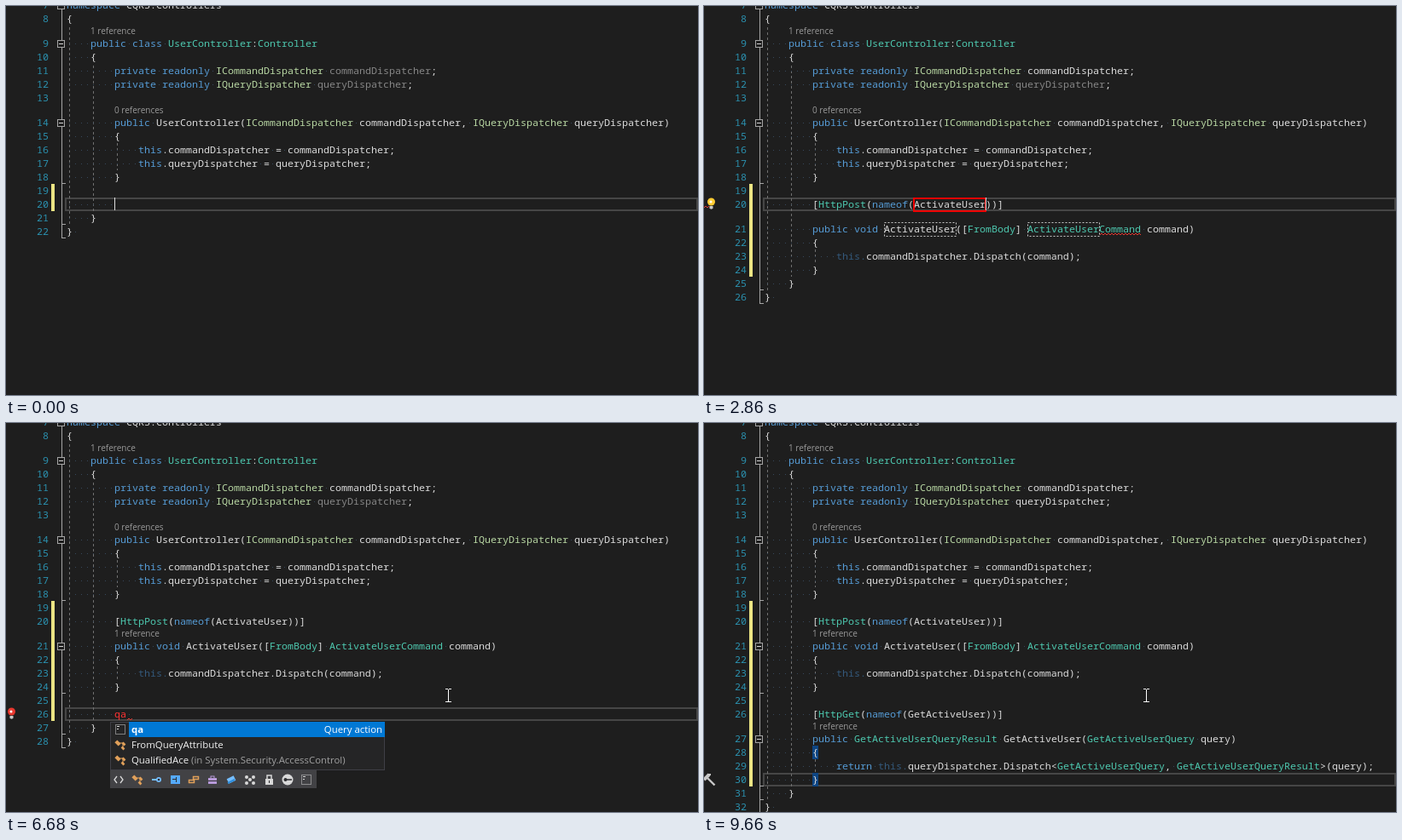
An HTML page with a canvas for the animation above (9810 ms loop, 811 by 457 pixels).

```html
<!DOCTYPE html>
<html lang="en">
<head>
<meta charset="utf-8">
<title>Code templates</title>
<style>
html, body { margin: 0; width: 100%; height: 100%; overflow: hidden; background: #1e1e1e; }
canvas { display: block; }
</style>
</head>
<body>
<canvas id="stage" width="811" height="457"></canvas>
<script>
const g = document.getElementById('stage').getContext('2d');
const LOOP = 9810, CW = 7, LEFT = 71;
const CODE = '11.667px "Noto Sans Mono", "DejaVu Sans Mono", monospace';
const UI = '"Open Sans", "Noto Sans", sans-serif';
const COLORS = { d: '#dcdcdc', k: '#569cd6', t: '#4ec9b0', i: '#b8d7a3', u: '#868686', f: '#34597b', r: '#ff3333' };
const colX = c => LEFT + c * CW;

// Last entry whose start time has passed.
function pick(t, steps) {
  let cur = steps[0];
  for (const s of steps) if (t >= s[0]) cur = s;
  return cur;
}

function rect(color, x, y, w, h) {
  g.fillStyle = color;
  g.fillRect(x, y, w, h);
}

function frame(color, x, y, w, h, width = 1, dash = []) {
  g.strokeStyle = color;
  g.lineWidth = width;
  g.setLineDash(dash);
  g.strokeRect(x, y, w, h);
  g.setLineDash([]);
}

function line(color, pts, width = 1, dash = []) {
  g.strokeStyle = color;
  g.lineWidth = width;
  g.setLineDash(dash);
  g.beginPath();
  pts.forEach(([x, y]) => g.lineTo(x, y));
  g.stroke();
  g.setLineDash([]);
}

function disc(color, x, y, r) {
  g.fillStyle = color;
  g.beginPath();
  g.arc(x, y, r, 0, 7);
  g.fill();
}

function label(text, x, y, color, font, align = 'left') {
  g.font = font;
  g.fillStyle = color;
  g.textAlign = align;
  g.fillText(text, x, y);
  g.textAlign = 'left';
}

function squiggle(x0, x1, y) {
  const pts = [];
  for (let x = x0; x <= x1; x += 2) pts.push([x, y + ((x - x0) / 2 % 2 ? -1 : 1)]);
  line('#e8382f', pts);
}

// ^c sets a colour, « » dashed field, ‹ › active field, ~ toggles a squiggle.
function codeLine(src, y) {
  let col = 0, color = 'd', word = '', box = 0, wave = -1;
  const flush = () => {
    if (word) label(word, colX(col - word.length), y + 4, COLORS[color], CODE);
    word = '';
  };
  for (let i = 0; i < src.length; i++) {
    const ch = src[i];
    if (ch === '^') { flush(); color = src[++i]; }
    else if (ch === '«' || ch === '‹') { flush(); box = col; }
    else if (ch === '»') { flush(); frame('#c8c8c8', colX(box) + .5, y - 7.5, (col - box) * CW, 16, 1, [2, 2]); }
    else if (ch === '›') { flush(); frame('#f00000', colX(box), y - 7, (col - box) * CW, 15, 2); }
    else if (ch === '~') {
      flush();
      if (wave < 0) wave = col;
      else { squiggle(colX(wave) + 1, colX(col) + 1, y + 6); wave = -1; }
    } else if (ch === ' ') {
      flush();
      rect('#36475a', colX(col) + 3, y, 1, 1);
      col++;
    } else { word += ch; col++; }
  }
  flush();
}

function postLines(t) {
  const name = pick(t, [[1640, 'Action'], [1940, 'A'], [2090, 'Act'], [2250, 'Activ'], [2400, 'Activat'],
    [2550, 'ActivateU'], [2700, 'ActivateUs'], [2860, 'ActivateUser']])[1];
  const edit = t < 3090;
  const self = t < 2090 ? '^k' : '^f';
  return [
    `        [^tHttpPost^d(^knameof^d(${edit ? `‹${name}›` : name}))]`,
    `        ^kpublic void ^d${edit ? `«${name}»` : name}([^tFromBody^d] ^t` +
      (edit ? `«${name}»~Command~` : t < 3210 ? `~${name}Command~` : `${name}Command`) + ' ^dcommand)',
    '        {',
    `            ${self}this.^dcommandDispatcher.Dispatch(command);`,
    '        }'
  ];
}

function getName(t) {
  return pick(t, [[6990, 'Action'], [7190, 'Get'], [7310, 'GetAc'], [7440, 'GetActiv'],
    [7560, 'GetActiveUs'], [7690, 'GetActiveUser']])[1];
}

function getLines(t) {
  const name = getName(t), edit = t < 8830;
  const field = edit ? `«${name}»` : name;
  const c = t < 7970 ? '^d' : '^t';
  const end = t < 8080 ? '}~ ~' : '}';
  return [
    `        [^tHttpGet^d(^knameof^d(${edit ? `‹${name}›` : name}))]`,
    `        ^kpublic ${c}${field}QueryResult ^d${name}(${c}${field}Query ^dquery)`,
    '        {',
    `            ^kreturn ${t < 7310 ? '^k' : '^f'}this.^dqueryDispatcher.Dispatch<${c}${field}Query^d, ${c}${field}QueryResult^d>(query);`,
    '        ' + end
  ];
}

function rows(t) {
  const out = [
    '^knamespace ^dCQRS.Controllers',
    '{',
    '    ^kpublic class ^tUserController^d:^tController',
    '    {',
    `        ^kprivate readonly ^iICommandDispatcher ^${t < 1640 ? 'u' : 'd'}commandDispatcher^d;`,
    `        ^kprivate readonly ^iIQueryDispatcher ^${t < 7060 ? 'u' : 'd'}queryDispatcher^d;`,
    '',
    '        ^kpublic ^dUserController(^iICommandDispatcher ^dcommandDispatcher, ^iIQueryDispatcher ^dqueryDispatcher)',
    '        {',
    '            ^kthis^d.commandDispatcher = commandDispatcher;',
    '            ^kthis^d.queryDispatcher = queryDispatcher;',
    '        }',
    ''
  ];
  if (t < 1640) {
    out.push('        ' + pick(t, [[0, ''], [150, 'c'], [560, 'ca'], [840, '^rca~ ~'], [970, 'ca']])[1]);
  } else {
    out.push(...postLines(t));
    if (t >= 4470) out.push(t < 4870 ? '        ' : '');
    if (t >= 6990) out.push(...getLines(t));
    else if (t >= 4870)
      out.push('        ' + pick(t, [[0, ''], [6060, 'q'], [6420, 'qa'], [6610, '^rqa~ ~']])[1]);
  }
  out.push(t >= 6990 && t < 8080 ? '    ~}~' : '    }', '} ');
  return out;
}

function bulb(x, y, color) {
  disc(color, x, y - 2, 4.5);
  disc('#fff', x - .5, y - 2, 1.5);
  rect('#c8c8c8', x - 2, y + 3, 4, 3);
  rect('#8a8a8a', x - 1, y + 6, 2, 1);
}

function hammer(y) {
  line('#c8c8c8', [[4, y - 2], [12.5, y + 6.5]], 2.4);
  line('#c8c8c8', [[0, y], [6, y - 6]], 4);
  line('#c8c8c8', [[5, y - 6], [8, y - 6]], 2);
}

function mouse(x, y) {
  line('#fff', [[x + .5, y - 7], [x + .5, y + 8]], 1);
  for (const e of [y - 7.5, y + 7.5]) {
    line('#fff', [[x - 3, e], [x, e]]);
    line('#fff', [[x + 1, e], [x + 4, e]]);
  }
}

function snippetIcon(x, y) {
  frame('#d8d8d8', x - 5.5, y - 5.5, 11, 11, 1, [1, 1]);
  rect('#d8d8d8', x - 4, y - 4, 3, 1);
  rect('#d8d8d8', x - 4, y - 1, 2, 1);
}

function classIcon(x, y) {
  line('#e0a05a', [[x - 1, y - 2], [x + 3, y - 2], [x + 3, y + 3]]);
  for (const [dx, dy, r] of [[-3, -2, 3], [4, -1, 2], [3, 4, 2]]) {
    g.save();
    g.translate(x + dx, y + dy);
    g.rotate(Math.PI / 4);
    rect('#e0a05a', -r, -r * .7, r * 2, r * 1.4);
    g.restore();
  }
}

const barIcons = [
  (x, y) => {
    line('#d8d8d8', [[x - 2, y - 4], [x - 5, y], [x - 2, y + 4]], 1.3);
    line('#d8d8d8', [[x + 2, y - 4], [x + 5, y], [x + 2, y + 4]], 1.3);
  },
  classIcon,
  (x, y) => {
    line('#75beff', [[x - 5, y], [x + 2, y]], 2);
    disc('#75beff', x + 3, y, 3);
    disc('#2d2d30', x + 3, y, 1.3);
  },
  (x, y) => {
    rect('#55aaff', x - 5, y - 5, 11, 10);
    rect('#2d2d30', x - 3, y - 1, 4, 1);
    rect('#2d2d30', x + 1, y - 3, 1, 6);
  },
  (x, y) => {
    frame('#e0a05a', x - .5, y - 3.5, 6, 3, 1.5);
    frame('#e0a05a', x - 5.5, y + .5, 6, 3, 1.5);
  },
  (x, y) => {
    rect('#b699d8', x - 5, y - 2, 10, 7);
    frame('#b699d8', x - 2, y - 4, 4, 3);
    rect('#2d2d30', x - 5, y + 1, 10, 1);
  },
  (x, y) => {
    line('#75beff', [[x - 4, y + 2], [x + 4, y - 2]], 6);
    line('#2f8fdd', [[x - 4, y + 4], [x + 4, y]], 2);
  },
  (x, y) => {
    for (const [dx, dy] of [[-4, -3], [4, -3], [0, 0], [-4, 4], [4, 4]]) disc('#d8d8d8', x + dx, y + dy, 2);
  },
  (x, y) => {
    rect('#d8d8d8', x - 4, y - 1, 9, 7);
    frame('#d8d8d8', x - 2, y - 5, 5, 5, 1.5);
    rect('#2d2d30', x, y + 1, 1, 3);
  },
  (x, y) => {
    disc('#d8d8d8', x, y, 6.5);
    disc('#2d2d30', x - 2.5, y, 2);
    line('#2d2d30', [[x - 1, y], [x + 5, y]], 1.5);
  },
  snippetIcon
];

function popup(y, right, items) {
  const x = 122, h = items.length * 18 + 3;
  rect('#252526', x, y, right - x, h);
  frame('#3f3f46', x + .5, y + .5, right - x - 1, h - 1);
  items.forEach(([name, note, where], i) => {
    const cy = y + 9 + i * 18;
    if (!i) {
      rect('#0078d4', x + 22, y, right - x - 22, 18);
      snippetIcon(x + 12, cy);
      label(name, 147, cy + 4, '#fff', 'bold 11.4px ' + UI);
      label(note, right - 3, cy + 4, '#fff', '11.4px ' + UI, 'right');
    } else {
      classIcon(x + 12, cy);
      label(name, 147, cy + 4, '#f1f1f1', '11.4px ' + UI);
      if (where) label(where, 147 + g.measureText(name + ' ').width, cy + 4, '#a0a0a0', '11.4px ' + UI);
    }
  });
  rect('#424245', x, y + h, 242, 21);
  barIcons.forEach((icon, i) => icon(132 + i * 22, y + h + 11));
}

const list = (first, names) => [first, ...names.split(' ').map(n => [n])];
const CA = ['ca', 'Command action'], QA = ['qa', 'Query action'];
const C_LIST = list(CA, 'CallSite case catch char checked class const Controller');
const CA_LIST = list(CA, 'CallSite case catch Capture');
const Q_LIST = list(QA, 'QualifiedAce Queryable Queue IQueryable IQueryDispatcher FromQueryAttribute');
const QA_LIST = [QA, ['FromQueryAttribute'], ['QualifiedAce', '', '(in System.Security.AccessControl)']];

function caretCol(t) {
  if (t >= 1640 && t < 3090) return 25 + pick(t, [[1640, 6], [1940, 1], [2090, 3], [2250, 5], [2400, 7], [2550, 9], [2700, 10], [2860, 12]])[1];
  if (t >= 6990 && t < 8160 || t >= 8710 && t < 8830) return 24 + getName(t).length;
  return pick(t, [[0, 8], [150, 9], [560, 10], [1110, -1], [3090, 9], [3570, -1], [4100, 9], [4470, 8],
    [4940, -1], [5430, 8], [5960, -1], [6060, 9], [6420, 10], [6610, -1], [6910, 10], [8160, -1], [8830, 9], [9420, -1]])[1];
}

function draw(t) {
  rect('#1e1e1e', 0, 0, 811, 457);
  const text = rows(t), last = 6 + text.length;
  const lens = { 9: '1 reference', 14: '0 references' };
  if (t >= 1640) lens[21] = t >= 4220 ? '1 reference' : '';
  if (t >= 6990) lens[27] = t >= 9070 ? '1 reference' : '';
  const y = {};
  for (let n = 7, p = -17; n <= last; n++) y[n] = p += n in lens ? 29 : 16;

  // Changed-lines margin and current line
  const changed = t < 1640 ? 20 : t < 4470 ? 24 : t < 4870 ? 25 : t < 6990 ? 26 : 30;
  rect('#ece584', 53, 209, 4, y[changed] + 8 - 209);
  const cur = pick(t, [[0, 20], [3090, 24], [4470, 25], [4870, 26], [8830, 30]])[1];
  frame('#464646', 70, y[cur] - 7, 740, 14, 2);

  // Indent guides
  const guide = (x, a, b) => line('#707070', [[x + .5, a], [x + .5, b]], 1, [3, 3]);
  guide(74, y[8] + 10, y[last] - 8);
  guide(102, y[10] + 10, y[last - 1] - 8);
  guide(130, y[15] + 8, y[18] - 8);
  if (t >= 1640) guide(130, y[22] + 8, y[24] - 8);
  if (t >= 6990) guide(130, y[28] + 8, y[30] - 8);

  // Outlining
  const folds = [7, 9, 14], ends = [18, last - 1, last];
  if (t >= 4220) { folds.push(21); ends.push(24); }
  if (t >= 9190) { folds.push(27); ends.push(30); }
  line('#a5a5a5', [[65.5, 0], [65.5, y[last] + 7.5]]);
  for (const n of ends) line('#a5a5a5', [[65, y[n] + 7.5], [70, y[n] + 7.5]]);
  for (const n of folds) {
    rect('#1e1e1e', 60, y[n] - 4, 9, 9);
    frame('#a5a5a5', 60.5, y[n] - 3.5, 8, 8);
    rect('#d8d8d8', 62, y[n], 5, 1);
  }

  // Matching braces
  const pair = t >= 3210 && t < 4870 ? [22, 24] : t >= 8950 ? [28, 30] : [];
  for (const n of pair) rect('#0e4583', 127, y[n] - 8, 7, 16);

  text.forEach((s, i) => {
    const n = i + 7;
    label(n, 50, y[n] + 4, '#2b91af', CODE, 'right');
    codeLine(s, y[n]);
    if (lens[n]) label(lens[n], n === 9 ? 99 : 127, y[n] - 11, '#999', '10px ' + UI);
  });

  const col = caretCol(t);
  if (col >= 0) rect('#dcdcdc', colX(col), y[cur] - 8, 1, 15);

  // Margin icons
  if (t >= 2400 && t < 3090) {
    squiggle(0, 6, 236);
    bulb(8.5, 232, '#ffcc33');
  }
  if (t >= 3450 && t < 4940) hammer(y[24]);
  if (t >= 6680 && t < 8160) bulb(6.5, 341, '#e8382f');
  if (t >= 9420) hammer(y[30]);

  if (t >= 290 && t < 700) popup(242, 374, C_LIST);
  else if (t >= 700 && t < 970) popup(242, 374, CA_LIST);
  else if (t >= 6180 && t < 6540) popup(351, 444, Q_LIST);
  else if (t >= 6540 && t < 6910) popup(351, 444, QA_LIST);

  if (t >= 4870) mouse(518, 320);
}

const start = performance.now();
function tick() {
  draw((performance.now() - start) % LOOP);
  requestAnimationFrame(tick);
}
tick();
</script>
</body>
</html>
```
